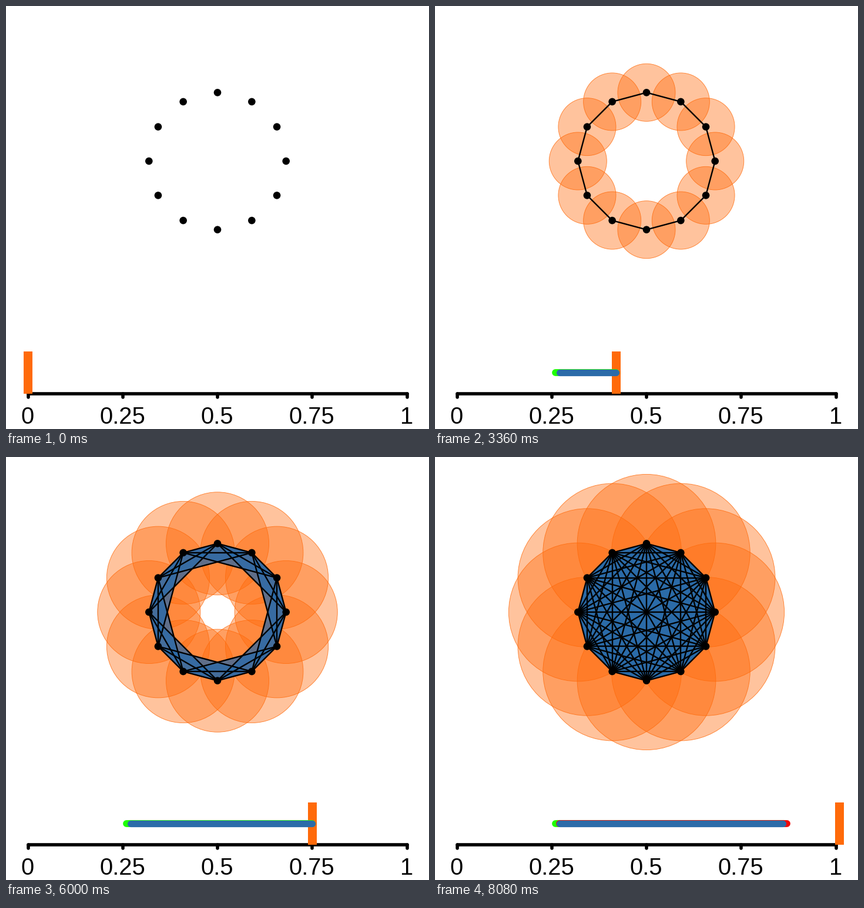
Animation, 720 px wide and 720 px high, one loop 8160 ms. Source, as a matplotlib script:

```python
from itertools import combinations

import matplotlib.pyplot as plt
import numpy as np
from matplotlib.animation import FuncAnimation
from matplotlib.collections import LineCollection, PolyCollection
from matplotlib.colors import to_rgba
from matplotlib.patches import Circle, Rectangle

SIZE, FRAMES, STEP = 720, 102, 80
ORANGE, BLUE, GREEN, RED = "#ff6a0a", "#2b6ba9", "#1eff00", "#f00808"
N, RING, CENTER = 12, 116.7, np.array([360, 264])
X0, SPAN, AXIS_Y, BAR_Y = 37.5, 645, 660, 624
BIRTH, DEATH = 0.26, 0.87
FONT = 40

fig = plt.figure(figsize=(SIZE / 72, SIZE / 72), dpi=72, facecolor="white")
ax = fig.add_axes([0, 0, 1, 1])
ax.set(xlim=(0, SIZE), ylim=(SIZE, 0))
ax.axis("off")


def scale_x(t):
    return X0 + SPAN * t


def stroke(color, width, z, xs=(), ys=()):
    line, = ax.plot(xs, ys, color=color, lw=width, zorder=z,
                    solid_capstyle="round")
    return line


# Vietoris-Rips complex of points on a circle
angles = 2 * np.pi * np.arange(N) / N
points = CENTER + RING * np.column_stack([np.cos(angles), np.sin(angles)])


def birth(simplex):
    """Scale at which all vertices of the simplex are pairwise joined."""
    gaps = [abs(a - b) for a, b in combinations(simplex, 2)]
    return max(np.sin(np.pi * g / N) for g in gaps)


def simplices(size):
    return [(birth(s), points[list(s)]) for s in combinations(range(N), size)]


edges, triangles = simplices(2), simplices(3)

disks = [ax.add_patch(Circle(p, 0, fc=to_rgba(ORANGE, 0.4),
                             ec=to_rgba(ORANGE, 0.8), lw=0.9, zorder=1))
         for p in points]
faces = ax.add_collection(
    PolyCollection([], facecolors=[to_rgba(BLUE, 0.5)], edgecolors="none",
                   zorder=2), autolim=False)
links = ax.add_collection(
    LineCollection([], colors="black", linewidths=2.4, capstyle="round",
                   zorder=3), autolim=False)
for p in points:
    ax.add_patch(Circle(p, 6.3, fc="black", ec="none", zorder=4))

# Scale axis
stroke("black", 5.6, 5, [X0, X0 + SPAN], [AXIS_Y, AXIS_Y])
for label in ("0", "0.25", "0.5", "0.75", "1"):
    x = scale_x(float(label))
    stroke("black", 5.6, 5, [x, x], [AXIS_Y, AXIS_Y + 6.3])
    advance = FONT * sum(0.278 if c == "." else 0.556 for c in label)
    ax.text(x - 0.5 - advance / 2, 711, label, fontsize=FONT,
            family="Liberation Sans", ha="left", va="baseline")

# Sweeping marker and the persistence bar
marker = ax.add_patch(Rectangle((0, AXIS_Y - 72), 15, 72, fc=ORANGE,
                                ec="none", zorder=6))
born = stroke(GREEN, 11.8, 7)
dead = stroke(RED, 11.8, 8)
alive = stroke(BLUE, 11.2, 9)


def span(line, start, end, shown):
    line.set_visible(shown)
    line.set_data([scale_x(start), scale_x(end)], [BAR_Y, BAR_Y])


def draw(i):
    t = i / 100
    for d in disks:
        d.set_radius(RING * t)
        d.set_visible(i > 0)
    faces.set_verts([v for b, v in triangles if b <= t + 1e-9])
    links.set_segments([v for b, v in edges if b <= t + 1e-9])
    marker.set_x(scale_x(t) - 7.5)
    span(born, BIRTH, min(t, DEATH - 0.01), t >= BIRTH)
    span(alive, BIRTH + 0.01, min(t, DEATH - 0.01), t >= BIRTH + 0.01)
    span(dead, BIRTH + 0.01, DEATH, t >= DEATH)
    return []


anim = FuncAnimation(fig, draw, frames=FRAMES, interval=STEP, repeat=True,
                     repeat_delay=0, blit=False)
plt.show()
```
